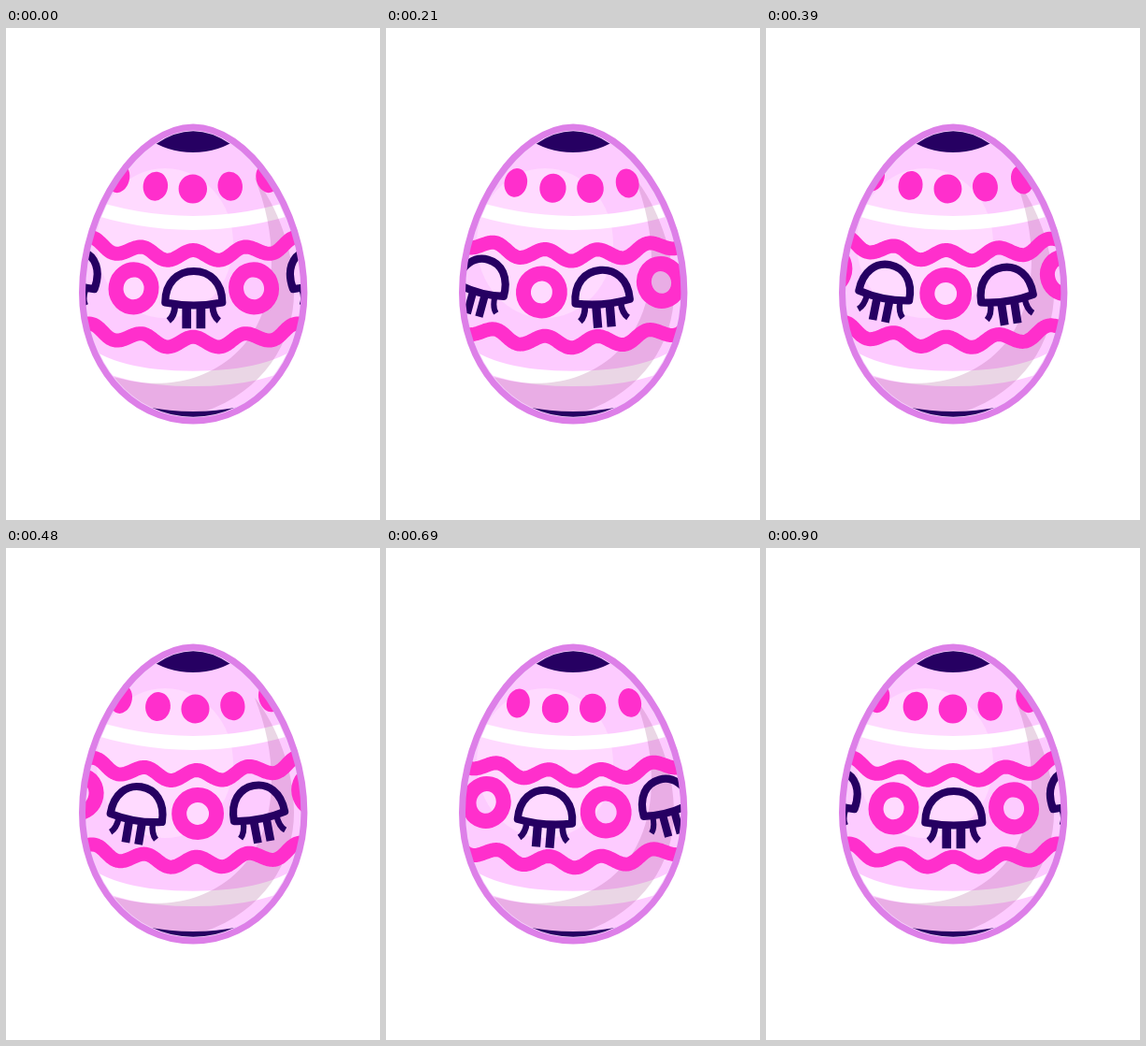
An HTML page with a canvas for the animation above (930 ms loop, 400 px wide and 526 px high).

```html
<!DOCTYPE html>
<html lang="en">
<head>
<meta charset="utf-8">
<title>Turning egg</title>
<style>
  html, body { margin: 0; width: 100%; height: 100%; overflow: hidden; background: #fff; }
  canvas { display: block; width: 400px; height: 526px; }
</style>
</head>
<body>
<canvas id="stage"></canvas>
<script>
const LOOP = 930, STEP = 30, TURN = 900;
const PINK = '#ff2fcc', NAVY = '#260062', RIM = '#dd7fe8';

const canvas = document.getElementById('stage');
const ctx = canvas.getContext('2d');
const ratio = window.devicePixelRatio || 1;
canvas.width = 400 * ratio;
canvas.height = 526 * ratio;

const egg = new Path2D(`M200.2 106 C258.3 106 318.9 193 318.9 283 C318.9 358 268.3 420.1 200.2 420.1
  C132 420.1 81.5 358 81.5 283 C81.5 193 142 106 200.2 106Z`);
const topBand = new Path2D('M80 180 Q200 222 320 180 L320 195.5 Q200 236.5 80 195.5Z');
const lowBand = new Path2D('M80 334.7 Q115 366.8 200 366.8 Q285 366.8 320 334.7 L320 355 Q280 383 200 383 Q120 383 80 355Z');
const shade = new Path2D(`M266 160 C290 190 308 237 308 283 C308 335 275 389 212 410 L212 430 L80 430
  L80 360 L108 371 C150 384 198 386 240 353 C286 317 298 240 266 160Z`);
const topCap = new Path2D('M150 117 Q172 133 200 133 Q228 133 250 117 L250 90 L150 90Z');
const lowCap = new Path2D('M150 405 Q200 415 250 405 L250 430 L150 430Z');

function fill(path, color) {
  ctx.fillStyle = color;
  ctx.fill(path);
}

function outline(width, color) {
  ctx.lineWidth = width;
  ctx.strokeStyle = color;
  ctx.stroke(egg);
}

function drawShell() {
  fill(egg, '#fdcbff');
  const glow = new Path2D();
  glow.ellipse(170, 230, 73, 80, 0, 0, 2 * Math.PI);
  fill(glow, '#ffdaff');
  fill(topBand, '#fff');
  fill(lowBand, '#fff');
  fill(shade, 'rgba(150,50,125,.2)');
  fill(topCap, NAVY);
  fill(lowCap, NAVY);
  outline(8.6, '#f5d3fb');
}

// Put a motif on an arc hanging below the pivot; (x, y) is its lowest point.
function place(x, y, radius, deg, draw) {
  const a = deg * Math.PI / 180;
  ctx.save();
  ctx.translate(x + radius * Math.sin(a), y - radius * (1 - Math.cos(a)));
  ctx.rotate(-a);
  draw(Math.abs(radius * Math.sin(a)));
  ctx.restore();
}

function dot(dist) {
  ctx.beginPath();
  ctx.ellipse(0, 0, 15.2 - 0.05 * dist, 15.5, 0, 0, 2 * Math.PI);
  ctx.fillStyle = PINK;
  ctx.fill();
}

function ring(dist) {
  ctx.beginPath();
  ctx.ellipse(0, 0, 20 - 0.016 * dist, 20, 0, 0, 2 * Math.PI);
  ctx.lineWidth = 16;
  ctx.strokeStyle = PINK;
  ctx.stroke();
}

function eye(dist) {
  const k = 1 - 0.0014 * dist;
  const x = v => v * k;
  ctx.strokeStyle = NAVY;
  ctx.lineJoin = 'round';

  ctx.lineWidth = 8.2;
  ctx.beginPath();
  ctx.moveTo(x(-30.5), 9.5);
  ctx.bezierCurveTo(x(-30.5), -12, x(-17), -24, 0, -24);
  ctx.bezierCurveTo(x(17), -24, x(30.5), -12, x(30.5), 9.5);
  ctx.quadraticCurveTo(0, 15.5, x(-30.5), 9.5);
  ctx.closePath();
  ctx.stroke();

  ctx.lineWidth = 9.7 * k;
  ctx.beginPath();
  for (const side of [-1, 1]) {
    ctx.moveTo(x(7.6 * side), 13);
    ctx.lineTo(x(7.6 * side), 37.3);
  }
  ctx.stroke();

  ctx.lineWidth = 7 * k;
  ctx.beginPath();
  for (const side of [-1, 1]) {
    ctx.moveTo(x(20 * side), 12);
    ctx.quadraticCurveTo(x(20.5 * side), 24, x(27 * side), 29);
  }
  ctx.stroke();
}

function wave(y, turn) {
  const radius = 440, length = 55.5, amp = 5.8;
  ctx.beginPath();
  for (let s = -140; s <= 140; s += 2) {
    const a = s / radius;
    const r = radius - amp * Math.cos(2 * Math.PI * (s / length - 2 * turn));
    ctx.lineTo(200.2 + r * Math.sin(a), y - radius + r * Math.cos(a));
  }
  ctx.lineWidth = 15;
  ctx.lineJoin = 'round';
  ctx.strokeStyle = PINK;
  ctx.stroke();
}

function drawPattern(turn) {
  for (let i = -5; i <= 3; i++) place(199.8, 172, 287, 8 * (i + 2 * turn), dot);
  wave(243.3, turn);
  wave(336, turn);
  for (let i = -4; i <= 2; i++) {
    place(200.8, 284, 370, 10 * (i + 2 * turn), i % 2 ? ring : eye);
  }
}

function draw(time) {
  const turn = Math.floor(time % LOOP / STEP) * STEP / TURN;
  ctx.setTransform(ratio, 0, 0, ratio, 0, 0);
  ctx.fillStyle = '#fff';
  ctx.fillRect(0, 0, 400, 526);
  ctx.save();
  ctx.clip(egg);
  drawShell();
  drawPattern(turn);
  ctx.restore();
  outline(7, RIM);
}

const start = performance.now();
function tick() {
  draw(performance.now() - start);
  requestAnimationFrame(tick);
}
tick();
</script>
</body>
</html>
```
